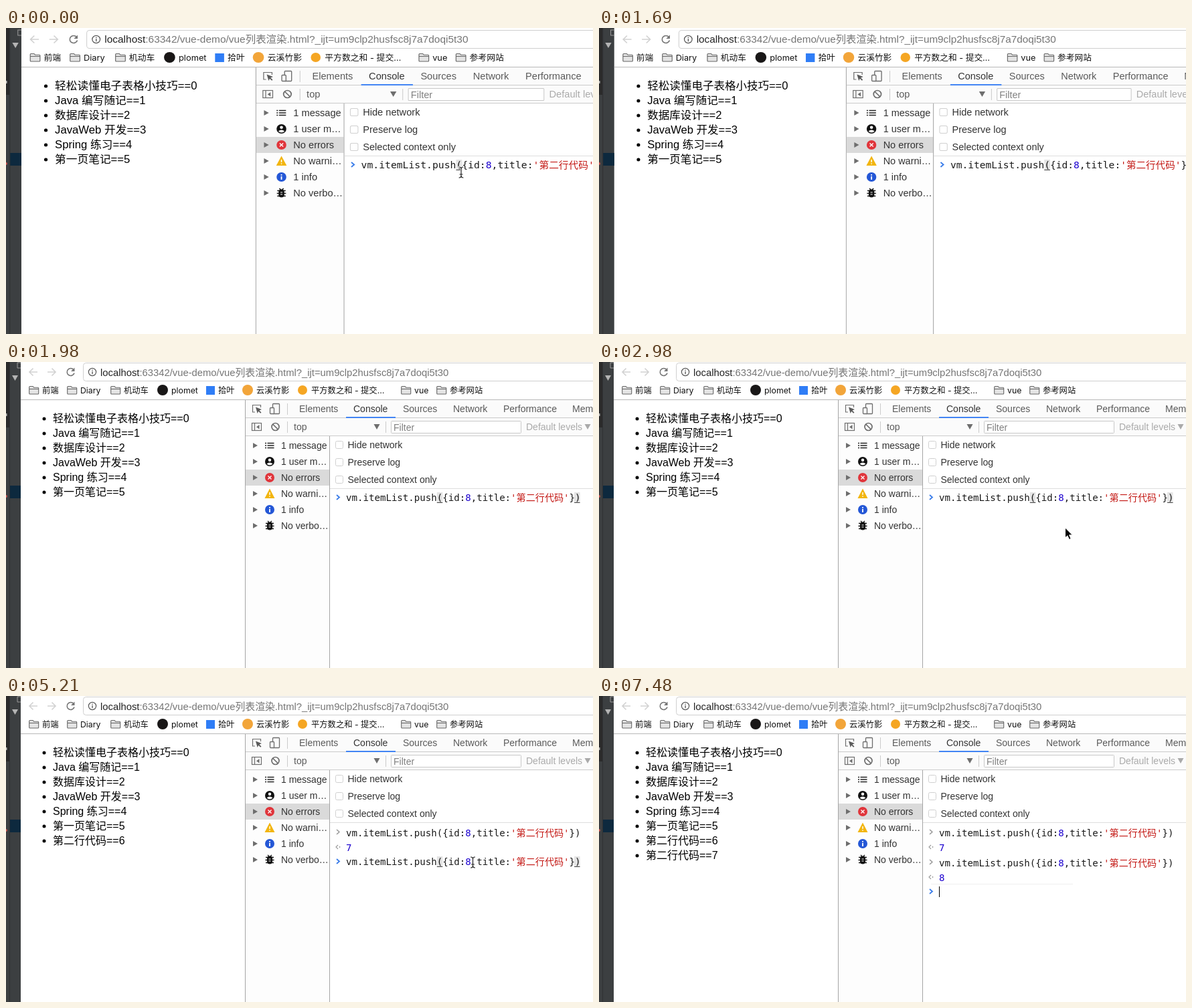
These frames come from a looping animation (877x458 px, 7580 ms). An HTML page:

```html
<!DOCTYPE html>
<html lang="zh">
<head>
<meta charset="utf-8">
<style>
  html, body { margin: 0; width: 100%; height: 100%; overflow: hidden; background: #fff; }
  svg { display: block; width: 877px; height: 458px; }
  text { white-space: pre; }
  .ui { font: 14px "Liberation Sans", "Noto Sans CJK SC", sans-serif; fill: #5a5a5a; }
  .dark { fill: #333; }
  .url { font-size: 14.8px; fill: #757575; }
  .mark { font: 12.3px Inter, "Noto Sans CJK SC", sans-serif; fill: #111; }
  .page { font: 16px "Liberation Sans", "Noto Sans CJK SC", sans-serif; fill: #000; }
  .code { font: 14.1px "DejaVu Sans Mono", "Noto Sans CJK SC", monospace; fill: #1a1a1a; }
  .num { fill: #1c00cf; }
  .str { fill: #c41a16; }
</style>
</head>
<body>
<svg viewBox="0 0 877 458">
  <g id="camera">
    <g id="chrome"></g>
    <g id="list"></g>
    <g id="console"></g>
  </g>
  <g id="arrow"><path d="M0 0V15L3.4 11.9L6 17.6L8.6 16.5L6.1 10.9H10.8Z" fill="#000" stroke="#fff"/></g>
  <g id="beam" fill="none" stroke-linecap="round">
    <path d="M-3-8Q0-8 0-5Q0-8 3-8M0-5V5M-3 8Q0 8 0 5Q0 8 3 8M-2 3H2" stroke="#fff" stroke-width="3"/>
    <path d="M-3-8Q0-8 0-5Q0-8 3-8M0-5V5M-3 8Q0 8 0 5Q0 8 3 8M-2 3H2" stroke="#222" stroke-width="1.2"/>
  </g>
</svg>
<script>
const LOOP = 7580;
const $ = id => document.getElementById(id);
const rect = (x, y, w, h, fill, more = '') =>
  `<rect x="${x}" y="${y}" width="${w}" height="${h}" fill="${fill}" ${more}/>`;
const circle = (x, y, r, fill, more = '') => `<circle cx="${x}" cy="${y}" r="${r}" fill="${fill}" ${more}/>`;
const line = (d, color, width = 1, fill = 'none') =>
  `<path d="${d}" fill="${fill}" stroke="${color}" stroke-width="${width}"/>`;
const shape = (d, fill) => `<path d="${d}" fill="${fill}"/>`;
const text = (x, y, s, cls = 'ui', more = '') => `<text x="${x}" y="${y}" class="${cls}" ${more}>${s}</text>`;
const down = (x, y, color) => shape(`M${x - 4.5} ${y - 4}h9l-4.5 8z`, color);

function ide() {
  return rect(0, -5, 22, 470, '#3c3f41') + rect(0, -5, 5, 103, '#2b2b2b') +
    rect(5, -5, 1, 470, '#2f3133') + rect(6, 185, 16, 19, '#0d293e') +
    line('M22 1h-5v8h5', '#9a9a9a') + down(13.5, 24, '#b4b4b4') +
    circle(0, 201, 2, '#c75450') + rect(0, 77, 1.5, 4, '#bbb');
}

function folder(x) {
  return line(`M${x + .7} 47v-9.5q0-1 1-1h4.5l1.5 1.8h6q1 0 1 1v7.7q0 1-1 1h-12q-1 0-1-1zM${x + .7} 40.5h14`,
    '#666', 1.1, '#e4e4e4');
}

function toolbar() {
  const info = circle(129, 15, 5.6, 'none', 'stroke="#555" stroke-width="1.2"') +
    rect(128.4, 14, 1.3, 4.2, '#555') + rect(128.4, 11.6, 1.3, 1.4, '#555');
  const folders = [[34, '前端'], [91, 'Diary'], [156, '机动车'], [590, 'vue'], [643, '参考网站']];
  const sites = [[247, 'plomet'], [317, '拾叶'], [374, '云溪竹影'], [456, '平方数之和 - 提交…']];
  return line('M47 15H35M40.5 9.5L35 15l5.5 5.5', '#d2d2d2', 1.6) +
    line('M62 15h12M68.5 9.5L74 15l-5.5 5.5', '#d2d2d2', 1.6) +
    line('M101 11.5a5.5 5.5 0 1 0 1 5', '#757575', 1.6) + shape('M102.5 8.5v5.5h-5.5z', '#757575') +
    rect(115.5, 1.5, 800, 27, '#fff', 'rx="4" stroke="#cfcfcf"') + info +
    text(141, 20.5, '<tspan fill="#222">localhost</tspan>:63342/vue-demo/vue列表渲染.html?_ijt=um9clp2husfsc8j7a7doqi5t30', 'ui url') +
    folders.map(([x, s]) => folder(x) + text(x + 20, 47, s, 'mark')).join('') +
    sites.map(([x, s]) => text(x, 47, s, 'mark')).join('') +
    circle(234, 42, 8, '#191717') + rect(299, 36, 13, 13, '#2f7df6') +
    circle(361, 42, 8, '#f2a53a') + circle(443, 42, 7, '#f5a623') +
    rect(22, 56, 855, 1, '#b9b9b9');
}

function devtools() {
  const tabs = [[438, 'Elements'], [519, 'Console'], [593, 'Sources'], [668, 'Network'],
    [743, 'Performance'], [846, 'Memory']];
  const bar = '#fbfbfb';
  const inspect = line('M372 75h-3.5V64.5H380.5V68', '#6e6e6e', 1.2) +
    shape('M373 67.5l9 3.5-3.5 1.5 3 3-1.3 1.3-3-3-1.5 3.2z', '#5a5a5a');
  const device = rect(398.5, 62.5, 10, 15, 'none', 'stroke="#6e6e6e" stroke-width="1.3" rx="1"') +
    rect(394.5, 68.5, 6, 9, bar, 'stroke="#6e6e6e" stroke-width="1.3" rx="1"');
  const toggle = rect(367.5, 91.5, 14, 11, 'none', 'stroke="#6e6e6e" stroke-width="1.2"') +
    line('M371.5 91v12', '#6e6e6e', 1.2) + shape('M378.5 94v6.5l-4.5-3.2z', '#6e6e6e');
  const clear = circle(402.5, 97, 5.5, 'none', 'stroke="#6e6e6e" stroke-width="1.7"') +
    line('M398.5 93l8 8', '#6e6e6e', 1.7);
  return rect(358, 57, 519, 53, bar) + rect(357, 57, 1, 401, '#a5a5a5') +
    rect(358, 83, 519, 1, '#cbcbcb') + rect(358, 110, 519, 1, '#cbcbcb') +
    rect(508, 82, 74, 2, '#4285f4') + inspect + device + toggle + clear +
    rect(420, 62, 1, 17, '#cbcbcb') + rect(420, 89, 1, 17, '#cbcbcb') + rect(567, 89, 1, 17, '#cbcbcb') +
    tabs.map(([x, s]) => text(x, 75, s, s == 'Console' ? 'ui dark' : 'ui')).join('') +
    text(430, 102, 'top') + down(554, 97, '#6e6e6e') +
    rect(575.5, 88.5, 194, 18, '#fff', 'stroke="#c8c8c8" rx="1"') +
    text(579, 103, 'Filter', 'ui', 'style="fill:#808080"') +
    text(777, 102, 'Default levels', 'ui', 'style="fill:#aaa"') + down(869, 97, '#aaa');
}

function sidebar() {
  const bug = line('M388 241.5h12M387.5 245.5h13M388 249.5h12M391 238l2 2M397 238l-2 2', '#111', 1.3) +
    rect(390, 239.5, 8, 12, '#111', 'rx="4"') + line('M392.5 244h3M392.5 247h3', '#fff', 1.2);
  const icons =
    line('M390.5 121.5h10M390.5 125h10M390.5 128.5h10M387 121.5h2M387 125h2M387 128.5h2', '#222', 1.6) +
    circle(394, 149, 7, '#111') + circle(394, 146.7, 2.2, '#fff') + shape('M389.5 152.5q4.5-4 9 0q-4.5 4-9 0z', '#fff') +
    circle(394, 173, 7, '#e0353b') + line('M391.5 170.5l5 5m0-5l-5 5', '#fff', 1.4) +
    line('M394 191.5l6 11.5h-12z', '#f2b50f', 1.8, '#f2b50f') + line('M394 195v4M394 200.5v1.5', '#fff', 1.4) +
    circle(394, 221, 7, '#2457d6') + line('M394 217v1.8M394 220v5', '#fff', 1.8) + bug;
  const rows = ['1 message', '1 user m…', 'No errors', 'No warni…', '1 info', 'No verbo…'];
  return rect(358, 111, 125, 347, '#fdfdfd') + rect(358, 161, 125, 24, '#dadada') +
    rect(483, 111, 1, 347, '#a5a5a5') + icons +
    rows.map((s, i) => shape(`M369 ${121 + i * 24}v8l7-4z`, '#6e6e6e') +
      text(411, 130 + i * 24, s, 'ui dark')).join('');
}

function options() {
  return ['Hide network', 'Preserve log', 'Selected context only'].map((s, i) =>
    rect(492.5, 118.5 + i * 26, 11, 11, '#fff', 'rx="2" stroke="#d0d0d0"') +
    text(510.5, 129 + i * 26, s, 'ui dark')).join('') + rect(484, 189, 393, 1, '#dedede');
}

const books = ['轻松读懂电子表格小技巧', 'Java 编写随记', '数据库设计', 'JavaWeb 开发', 'Spring 练习', '第一页笔记'];
const listItems = added => [...books, ...Array(added).fill('第二行代码')].map((s, i) =>
  circle(57, 85 + i * 22, 2.5, '#000') + text(70, 90 + i * 22, `${s}==${i}`, 'page')).join('');

const chevron = (y, color, width) => line(`M494 ${y - 4}l4 3.5-4 3.5`, color, width);
const command = y => text(508, y + 5, `vm.itemList.push({id:<tspan class="num">8</tspan>,title:` +
  `<tspan class="str">'第二行代码'</tspan>})`, 'code');
const bracket = (x, y) => rect(x, y - 8, 8.5, 16, '#e4e4e4') + rect(x, y + 7, 8.5, 1, '#444');

function consoleRows(runs, draft, caret, rule) {
  let out = '';
  for (let i = 0; i < runs; i++) {
    const y = 205 + i * 45;
    out += chevron(y - 1, '#8c8c8c', 1.2) + command(y) +
      line(`M496 ${y + 18}l-3 3 3 3`, '#999', 1.1) + circle(498.5, y + 21, .9, '#999') +
      text(508, y + 27, 7 + i, 'code num');
  }
  const y = 203 + runs * 45;
  out += chevron(y, '#3b7de9', 1.8);
  if (draft) out += bracket(643.8, y) + bracket(849, y) + command(y);
  if (rule) out += rect(496, 281, 212, 1, '#efefef');
  if (caret) out += rect(draft ? 857 : 508, y - 8, 1, 16, '#000');
  return out;
}

// Each list holds [start time, ...values]; the last started entry applies.
const zooms = [[0, 1.0445, 2], [1690, 1.0333, 2], [1810, 1.022, 2], [1980, 1, 0]];
const pointer = [[0, 'beam', 680, 216], [450, 'arrow', 748, 277], [600, ''], [2100, 'arrow', 865, 326],
  [2250, 'arrow', 748, 304], [2390, 'arrow', 736, 292], [2540, 'arrow', 730, 286],
  [2690, 'arrow', 696.5, 249], [2830, 'arrow', 696.5, 248], [3570, 'beam', 697.5, 249],
  [5360, 'arrow', 696.5, 248], [6400, '']];
const input = [[0, 0, true], [3570, 1, false], [4610, 1, true], [5360, 2, false]];
const blink = [[0, 0], [2540, 1], [2980, 0], [3570, 1], [4170, 0], [4610, 1], [5210, 0],
  [5360, 1], [5800, 0], [6400, 1], [6850, 0], [7480, 1]];
const at = (steps, t) => steps.filter(s => s[0] <= t).pop().slice(1);

$('chrome').innerHTML = rect(22, -5, 860, 470, '#fff') + ide() + toolbar() + devtools() + sidebar() + options();

let last = '';
function draw(now) {
  const t = now % LOOP;
  const [zoom, dy] = at(zooms, t), [kind, x, y] = at(pointer, t);
  const [runs, draft] = at(input, t), [caret] = at(blink, t);
  const rule = t >= 6400;
  const key = [zoom, kind, x, y, runs, draft, caret, rule].join();
  if (key != last) {
    last = key;
    $('camera').setAttribute('transform', `translate(0 ${dy}) scale(${zoom} 1)`);
    $('list').innerHTML = listItems(runs);
    $('console').innerHTML = consoleRows(runs, draft, caret, rule);
    for (const id of ['arrow', 'beam']) {
      $(id).style.display = id == kind ? '' : 'none';
      if (id == kind) $(id).setAttribute('transform', `translate(${x} ${y})`);
    }
  }
  requestAnimationFrame(draw);
}
draw(0);
</script>
</body>
</html>
```
